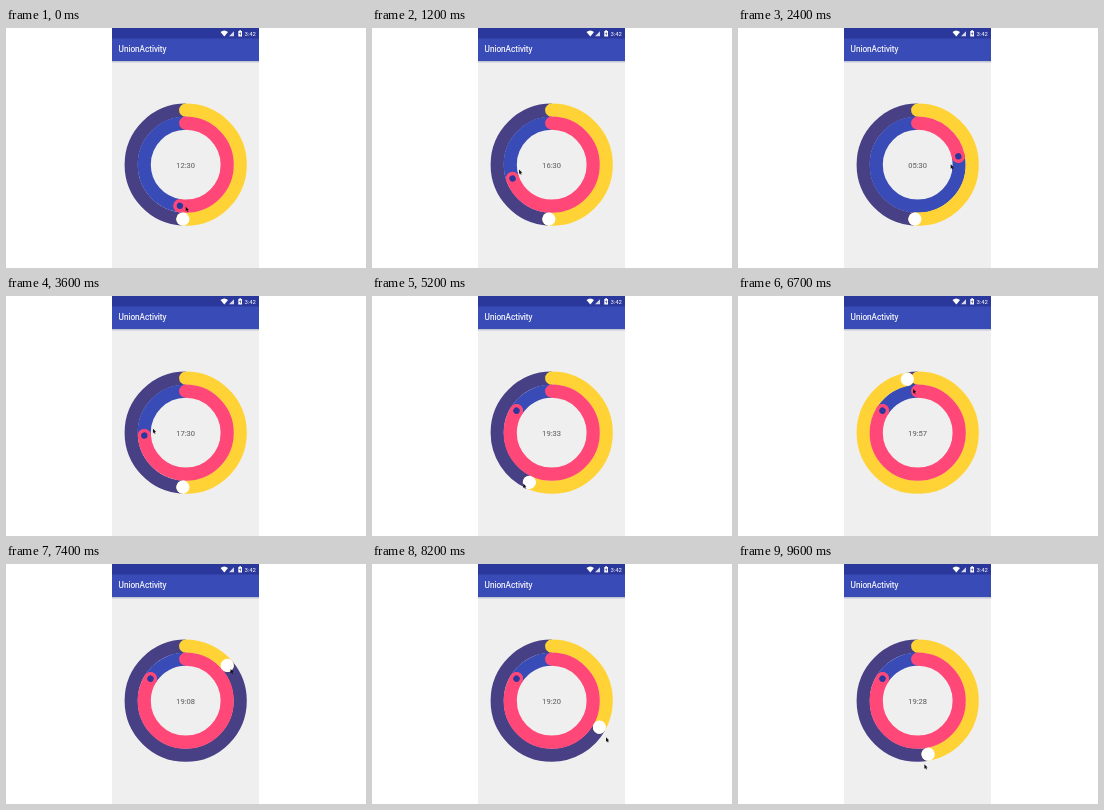
An HTML page for the animation above (9800 ms loop, 360x240 px).

```html
<!DOCTYPE html>
<html lang="en">
<head>
<meta charset="utf-8">
<title>Dial time picker</title>
<style>
  html, body { margin: 0; width: 100%; height: 100%; overflow: hidden; background: #fff; }
  svg { display: block; width: 360px; height: 240px; }
  text { font-family: Roboto, sans-serif; }
  .ring { fill: none; stroke-width: 13.2; }
  .arc { stroke-linecap: round; }
</style>
</head>
<body>
<svg viewBox="0 0 360 240">
  <defs>
    <linearGradient id="shadow" x2="0" y2="1">
      <stop stop-color="#b9bccd"/>
      <stop offset="1" stop-color="#efefef"/>
    </linearGradient>
  </defs>

  <rect x="106" width="147" height="240" fill="#efefef"/>
  <rect x="106" width="147" height="11" fill="#2b389b"/>
  <rect x="106" y="10.5" width="147" height="22.5" fill="#384bb6"/>
  <rect x="106" y="33" width="147" height="2.5" fill="url(#shadow)"/>

  <g fill="#fff">
    <path d="M214.500 4Q218.300 .8 222 4L218.300 8.500Z"/>
    <path d="M223 8.200H228V3.200Z" opacity=".8"/>
    <path d="M232.300 3H233.300V2.200H235V3H236V8.500H232.300Z"/>
    <path d="M234.500 3.800L233.200 6H234.200V7.700L235.300 5.500H234.400Z" fill="#2b389b"/>
    <text x="238.400" y="7.500" font-size="6">3:42</text>
    <text x="112.600" y="24.300" font-size="8.200" stroke="#fff" stroke-width=".15">UnionActivity</text>
  </g>

  <g transform="translate(179.700 136.700)">
    <g class="ring" transform="rotate(-90)">
      <circle id="minuteTrack" r="54.500" pathLength="360" stroke="#484085"/>
      <circle id="hourTrack" r="41.500" pathLength="360" stroke="#384bb6"/>
      <g class="arc">
        <circle id="minuteArc" r="54.500" pathLength="360" stroke="#ffd335"/>
        <circle id="hourArc" r="41.500" pathLength="360" stroke="#ff4778"/>
      </g>
    </g>
    <circle id="minuteKnob" cy="-54.500" r="6.600" fill="#fff"/>
    <g id="hourKnob">
      <circle cy="-41.500" r="6.500" fill="#ff4778"/>
      <circle cy="-41.500" r="3.200" fill="#2b389b"/>
    </g>
    <text id="label" y="2.800" font-size="7.500" fill="#666" stroke="#666" stroke-width=".1" text-anchor="middle"></text>
    <path id="cursor" d="M0 0V4.500L1 3.600 1.800 5.200 2.600 4.800 1.800 3.200H3.200Z" fill="#111"/>
  </g>
</svg>
<script>
const LOOP = 9800, STEP = 100, LAST = 9600;
const $ = id => document.getElementById(id);

const ramp = (t, from, to) => Math.min(1, Math.max(0, (t - from) / (to - from)));
const mix = (a, b, k) => a + (b - a) * k;
const cosDeg = a => Math.cos(a * Math.PI / 180);
const sinDeg = a => Math.sin(a * Math.PI / 180);
const pad = n => String(Math.round(n)).padStart(2, '0');

// Both knobs are dragged clockwise at a steady pace; the second one slows down.
const hourAngle = t => mix(188, 662, ramp(t, 800, 3830));
const minuteAngle = t => 183 + 166 * ramp(t, 4980, 6700)
  + 130 * ramp(t, 6700, 8200) + 50 * ramp(t, 8200, LAST);

function setDial(name, angle) {
  const turn = angle % 360;
  $(name + 'Track').setAttribute('stroke-dasharray', `0 ${turn} 360`);
  $(name + 'Arc').setAttribute('stroke-dasharray', `${turn} 360`);
  $(name + 'Knob').setAttribute('transform', `rotate(${turn})`);
}

// The cursor runs slightly ahead of the hour knob, then moves over to the minute knob.
function setCursor(t, hour, minute) {
  const approach = ramp(t, 0, 800), change = ramp(t, 3900, 4600);
  const angle = mix(hour + mix(-8, 11, approach), minute + 5, change);
  const radius = mix(mix(42, 33, approach), 54 - 12 * cosDeg(angle + 40), change);
  $('cursor').setAttribute('transform',
    `translate(${radius * sinDeg(angle)} ${-radius * cosDeg(angle)})`);
}

function draw(now) {
  const t = Math.min(LAST, Math.floor(now % LOOP / STEP) * STEP);
  const hour = hourAngle(t), minute = minuteAngle(t);
  setDial('hour', hour);
  setDial('minute', minute);
  setCursor(t, hour, minute);
  $('label').textContent =
    `${pad(hour % 360 / 360 * 23)}:${pad(minute % 360 / 360 * 59)}`;
}

const start = performance.now();
function tick() {
  draw(performance.now() - start);
  requestAnimationFrame(tick);
}
tick();
</script>
</body>
</html>
```
